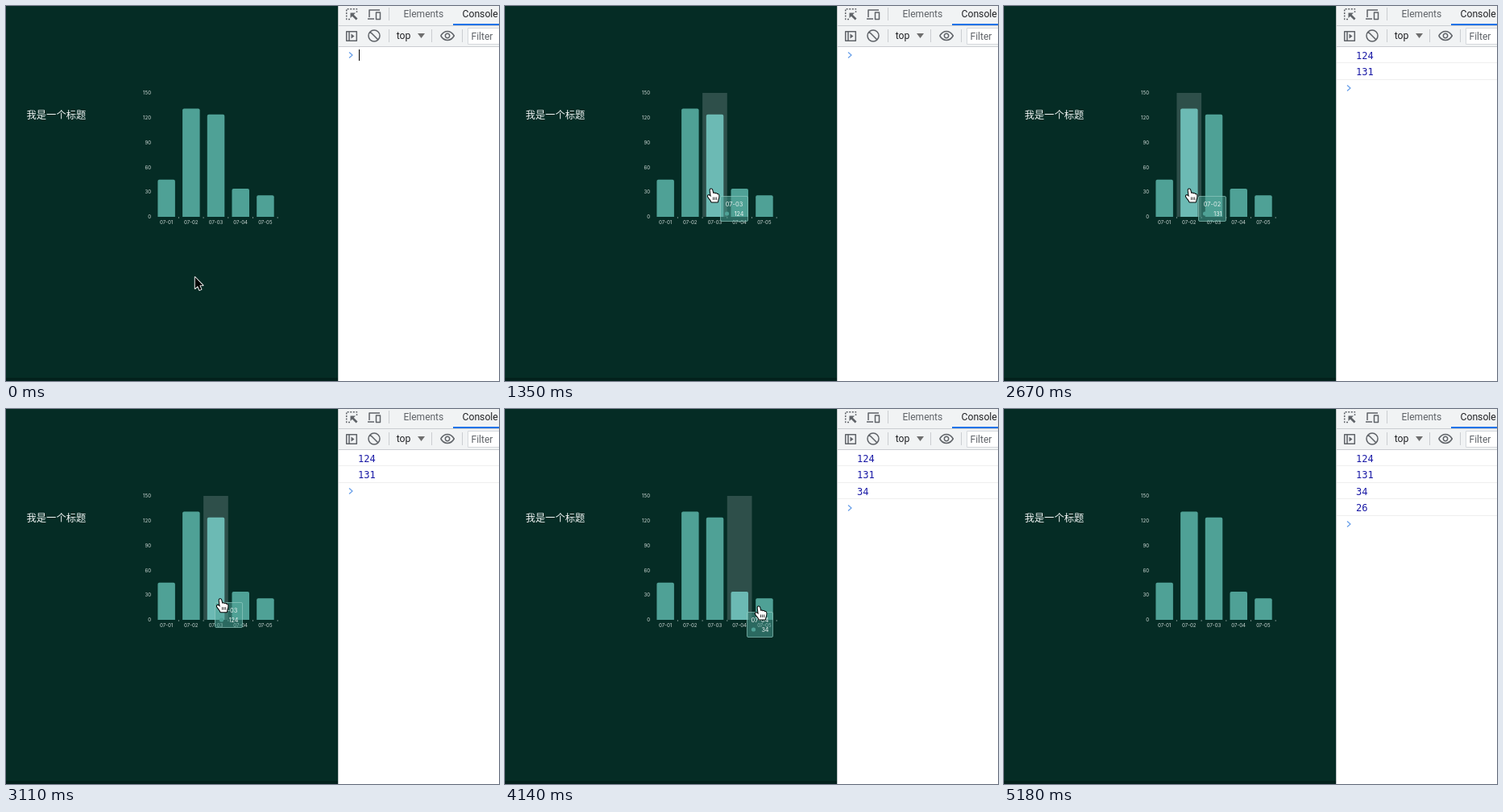
Animation of 612 by 466 pixels, one loop 5.46 s. Source, as an HTML page with a canvas:

```html
<!DOCTYPE html>
<html lang="zh">
<head>
<meta charset="utf-8">
<style>
  html, body { margin: 0; width: 100%; height: 100%; overflow: hidden; }
  canvas { display: block; }
</style>
</head>
<body>
<canvas id="stage" width="612" height="466"></canvas>
<script>
const ctx = document.getElementById('stage').getContext('2d');
const LOOP = 5460, TICK = 148;
const SANS = 'Roboto, sans-serif', AXIS = 'Inter, sans-serif';
const MONO = '"DejaVu Sans Mono", monospace';

const values = [45, 131, 124, 34, 26];
const left = 183.7, base = 262, top150 = 108, pitch = 30.7, barWidth = 21.5;
const barX = i => left + i * pitch + 4.7;
const valueY = v => base - v * (base - top150) / 150;

// Pointer path: tick, x, y
const path = [
  [0, 234, 336], [1, 236, 333], [4, 236, 333], [6, 255, 262], [8, 257, 227],
  [13, 257, 227], [14, 243, 226], [15, 231, 227], [19, 231, 227], [22, 285, 240],
  [23, 287, 241], [25, 287, 241], [27, 290, 243], [28, 316, 245], [30, 317, 245],
  [31, 318, 246], [34, 590, 452]
];
// Clicks: tick, logged value
const clicks = [[11, 124], [17, 131], [24, 34], [30, 26]];

function pointerAt(tick) {
  const next = path.findIndex(p => p[0] >= tick);
  if (next <= 0) return { x: path[0][1], y: path[0][2] };
  const [a, b] = [path[next - 1], path[next]];
  const k = (tick - a[0]) / (b[0] - a[0]);
  return { x: a[1] + (b[1] - a[1]) * k, y: a[2] + (b[2] - a[2]) * k };
}

function rect(x, y, w, h, color) {
  ctx.fillStyle = color;
  ctx.fillRect(x, y, w, h);
}

function text(str, x, y, size, color, family, align = 'left') {
  ctx.font = `${size}px ${family}`;
  ctx.fillStyle = color;
  ctx.textAlign = align;
  ctx.fillText(str, x, y);
}

function shape(d, x, y, { fill, stroke, width = 1 }) {
  const p = new Path2D(d);
  ctx.save();
  ctx.translate(x, y);
  ctx.lineJoin = 'round';
  if (stroke) {
    ctx.strokeStyle = stroke;
    ctx.lineWidth = width;
    ctx.stroke(p);
  }
  if (fill) {
    ctx.fillStyle = fill;
    ctx.fill(p);
  }
  ctx.restore();
}

function roundBox(x, y, w, h, radii, fill, stroke) {
  ctx.beginPath();
  ctx.roundRect(x, y, w, h, radii);
  ctx.fillStyle = fill;
  ctx.fill();
  if (stroke) {
    ctx.strokeStyle = stroke;
    ctx.lineWidth = 1;
    ctx.stroke();
  }
}

function drawChart(active) {
  rect(0, 0, 412, 466, '#052c25');
  rect(0, 462, 412, 4, '#03211c');
  text('我是一个标题', 25.5, 140, 12.3, '#f0f4f3', '"Noto Sans CJK SC", "Noto Sans CJK", sans-serif');
  if (active >= 0) rect(left + active * pitch, top150, pitch, base - top150, '#2e4f4a');
  for (let v = 0; v <= 150; v += 30) text(v, 180, valueY(v) + 2.2, 6.1, '#ccd7d4', AXIS, 'right');
  values.forEach((v, i) => {
    const y = valueY(v);
    roundBox(barX(i), y, barWidth, base - y, [2, 2, 0, 0], i === active ? '#6cbab4' : '#4fa196');
    text('07-0' + (i + 1), left + (i + 0.5) * pitch, 271, 6.1, '#ccd7d4', AXIS, 'center');
    rect(left + (i + 1) * pitch - 0.5, base, 1, 2, '#6d8781');
  });
}

function drawTooltip(active, pointer) {
  const w = values[active] > 99 ? 34 : 32, h = 31;
  let x = pointer.x + 10;
  if (x + w > 340) x = pointer.x - 10 - w;
  x = Math.round(x) + 0.5;
  const y = Math.round(pointer.y + 10) - 0.5;
  roundBox(x, y, w, h, 1.5, 'rgba(79,161,150,.52)', 'rgba(150,205,195,.65)');
  text('07-0' + (active + 1), x + w / 2, y + 12, 7.5, '#e6efed', AXIS, 'center');
  ctx.beginPath();
  ctx.arc(x + 8, y + 21.5, 2.6, 0, Math.PI * 2);
  ctx.fillStyle = '#4fa196';
  ctx.fill();
  text(values[active], x + w - 5, y + 24.2, 7.2, '#eef5f3', AXIS, 'right');
}

function drawToolbar() {
  const icon = { stroke: '#5f6368', width: 1.5 };
  rect(412, 0, 1, 466, '#bfc5c6');
  rect(413, 0, 199, 466, '#fff');
  rect(413, 0, 199, 50, '#f1f3f4');
  rect(413, 24, 199, 1, '#cacdd1');
  rect(413, 50, 199, 1, '#cacdd1');
  rect(555, 22, 57, 2, '#1a73e8');
  [[475, 2], [475, 29], [528, 29], [566, 29]].forEach(([x, y]) => rect(x, y, 1, 16, '#cacdd1'));

  ctx.setLineDash([2, 1.6]);
  shape('M5 13.5H.7V.7H13.5V5', 422, 3, icon);
  ctx.setLineDash([]);
  shape('M5.5 5.5H12L9.7 7.8 14.5 12.6 12.6 14.5 7.8 9.7 5.5 12Z', 422, 3, { fill: '#5f6368' });
  shape('M2 10V1H15M0 12H8M10.5 4H15.5V12.5H10.5Z', 449, 4, icon);
  shape('M.7.7H13.3V12.3H.7ZM4 .7V12.3', 422, 31, icon);
  shape('M6.5 3.5 10.5 6.5 6.5 9.5Z', 422, 31, { fill: '#5f6368' });
  shape('M-7 0A7 7 0 1 1 7 0A7 7 0 1 1-7 0M-5-5 5 5', 457, 37, icon);
  shape('M0 0H9L4.5 6Z', 511, 34, { fill: '#6e6e6e' });
  shape('M-8.3 0Q-5-5.5 0-5.5T8.3 0Q5 5.5 0 5.5T-8.3 0M-2.7 0A2.7 2.7 0 1 1 2.7 0A2.7 2.7 0 1 1-2.7 0', 548, 37, icon);

  text('Elements', 493.5, 14, 12, '#5f6368', SANS);
  text('Console', 566.5, 14, 12.2, '#202124', SANS);
  text('top', 484.7, 41, 12.2, '#202124', SANS);
  roundBox(573.5, 27.5, 50, 20, 0, '#fff', '#d5d8dc');
  text('Filter', 577.5, 42, 12, '#5f6368', SANS);
}

function drawConsole(tick) {
  const rows = clicks.filter(c => c[0] <= tick);
  rows.forEach(([, v], i) => {
    text(v, 437, 66 + Math.round(i * 20.4), 12, '#1a1aa6', MONO);
    rect(413, 70 + Math.round(i * 20.7), 199, 1, '#eeeeee');
  });
  shape('M0-3.5 4 0 0 3.5', 426, 61 + Math.round(rows.length * 20.5), { stroke: '#6ea3ea', width: 1.4 });
  if (tick < 3) rect(438, 54, 1, 14, '#000');
}

function drawPointer({ x, y }) {
  const bar = values.findIndex((v, i) => x > barX(i) && x < barX(i) + barWidth && y > valueY(v) && y < base);
  if (bar < 0) {
    shape('M.7 1V15L4 12 6.3 17 8.5 16 6.3 11.2H10.5Z', x, y, { fill: '#000', stroke: '#fff', width: 1.8 });
  } else {
    shape('M-2 2Q-2.2.6-1 .6T.6 2L1.6 6Q3 4.8 4.1 6.4 5.4 5.5 6.2 7 7.8 6.6 8 8.5V12L6.6 17H-1.2Q-2-1 -2 2ZM-2 2',
      x, y, {});
    shape('M-2.3 2.2C-2.6.2-.2 0 .3 1.8L1.4 6C2.4 5.1 3.6 5.4 4 6.5 5 5.7 6 6.1 6.4 7.2 7.6 6.7 8.4 7.4 8.4 8.7 8.6 12 7.4 13 7 16.5H-.6C-1.2 14-4 12-5 9.8-5.6 8.2-3.8 7.6-2.6 9L-1.3 10.3Z',
      x, y, { fill: '#fff', stroke: '#000', width: 2 });
    shape('M1.5 10.5V14M3.6 10.5V14M5.7 10.5V14', x, y, { stroke: '#000', width: 0.8 });
  }
}

function render(time) {
  const tick = Math.min(36, Math.floor((time % LOOP + 6) / TICK));
  const visible = tick < 35;
  // The chart reacts one tick after the pointer.
  const hover = visible ? pointerAt(Math.max(0, tick - 1)) : { x: 0, y: 0 };
  const band = Math.floor((hover.x - left) / pitch);
  const active = hover.y > top150 && hover.y < base && band >= 0 && band < values.length ? band : -1;

  drawChart(active);
  if (active >= 0) drawTooltip(active, hover);
  drawToolbar();
  drawConsole(tick);
  if (visible) drawPointer(pointerAt(tick));
}

const start = performance.now();
function loop() {
  render(performance.now() - start);
  requestAnimationFrame(loop);
}
loop();
</script>
</body>
</html>
```
